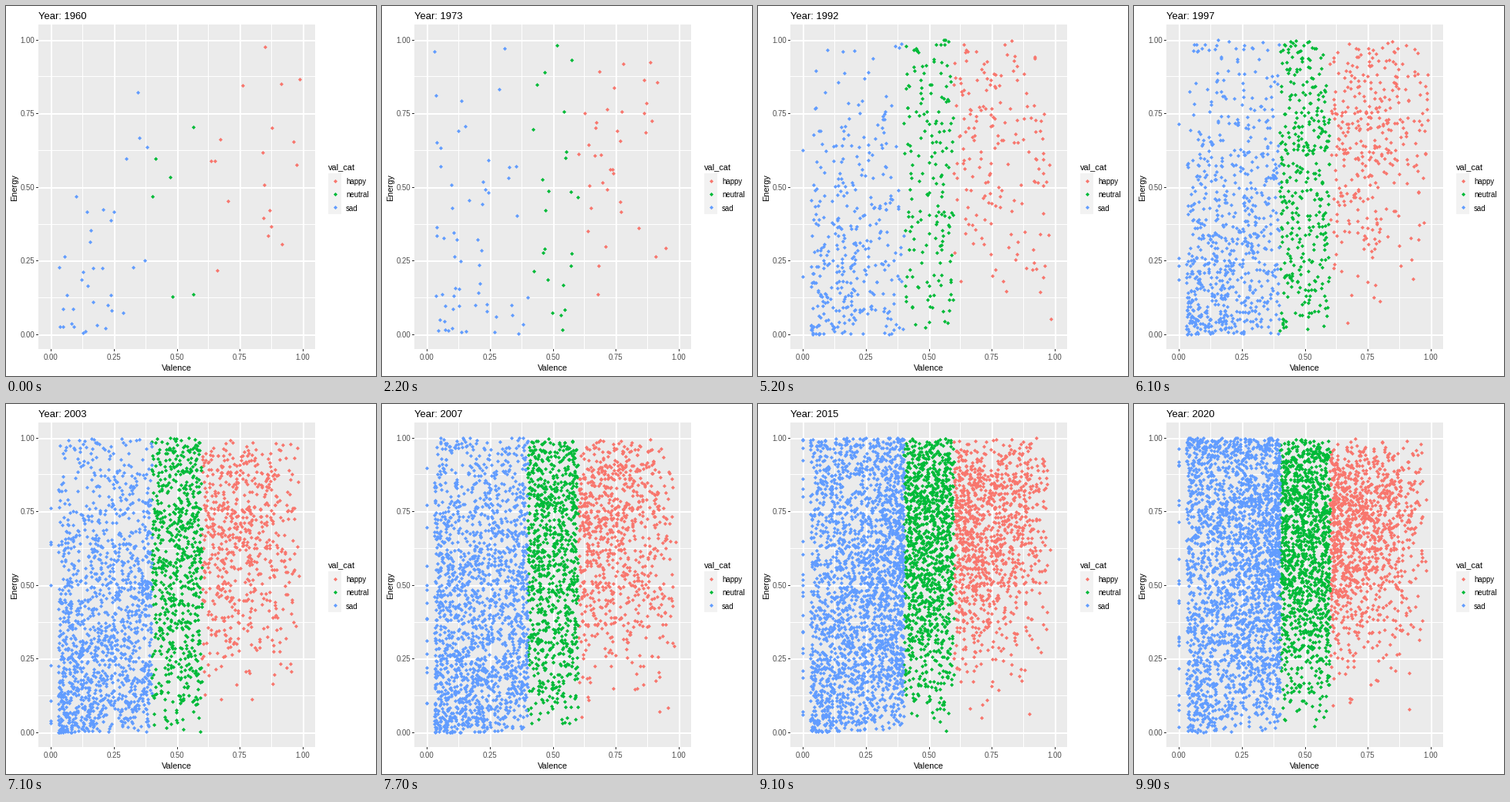
Write a matplotlib script that moves like this. It is 480 px wide and 480 px high and loops after 10 s.

```python
import numpy as np
import matplotlib.pyplot as plt
from matplotlib.animation import FuncAnimation
from matplotlib.patches import Rectangle

SIZE, FRAMES, STEP = 480, 100, 100
FIRST, LAST = 1960, 2020
LEFT, TOP, RIGHT, BOTTOM = 42, 24, 401, 445
COLORS = {"happy": "#F8766D", "neutral": "#00BA38", "sad": "#619CFF"}


def px(valence):
    return LEFT + 359 * (valence + 0.05) / 1.1


def py(energy):
    return 445.1 - 420.6 * (energy + 0.05) / 1.1


def count(u, start, growth):
    """Songs in a year: slow rise, then a logistic boom around 2003."""
    return int(start + 60 * u + growth / (1 + np.exp((0.71 - u) / 0.09)))


# Each mood returns valence and energy at progress u (0 to 1 over the years).

def happy(u, rng):
    n = count(u, 19, 1100)
    valence = 0.6 + 0.39 * rng.beta(1, 1 + 0.8 * u**2, n)
    return valence, rng.beta(2 + 1.8 * u**2, 1.4 + 0.5 * u**3, n)


def neutral(u, rng):
    n = count(u, 6, 1200)
    valence = rng.uniform(0.4, 0.6, n)
    return valence, rng.beta(1 + 1.3 * u**3, 1 + 0.4 * u**3, n)


def sad(u, rng):
    n = count(u, 36, 2450)
    t = rng.beta(0.8 + 0.1 * u, 1.4 - 0.65 * u, n)
    # quiet songs gather at the low-valence edge, less so in later years
    a = 0.6 + 0.15 * u + t * (0.4 + 0.7 * u**4)
    b = 0.8 + 2.7 * (1 - u) * (1 - 0.75 * t) + 0.6 * t
    valence, energy = 0.03 + 0.37 * t, rng.beta(a, b)
    # a few very loud songs, and a few without any valence
    energy = np.where(rng.random(n) < 0.03 * u, rng.uniform(0.96, 1, n), energy)
    valence = np.where(rng.random(n) < 0.012 * u, 0, valence)
    return valence, energy


MOODS = {"happy": happy, "neutral": neutral, "sad": sad}

plt.rcParams["font.family"] = "Liberation Sans"
fig = plt.figure(figsize=(SIZE / 72, SIZE / 72), dpi=72, facecolor="white")
ax = fig.add_axes([0, 0, 1, 1])
ax.set(xlim=(0, SIZE), ylim=(SIZE, 0))
ax.axis("off")


def box(x, y, w, h, color):
    ax.add_patch(Rectangle((x, y), w, h, fc=color, lw=0,
                           antialiased=False, zorder=1))


def label(x, y, text, size, color="black", **kw):
    return ax.text(x, y, text, fontsize=size, color=color, **kw)


def dots(mood, x=(), y=()):
    return ax.plot(x, y, "D", ms=3.6, mew=0, color=COLORS[mood], zorder=3)[0]


width, height = RIGHT - LEFT, BOTTOM - TOP
box(LEFT, TOP, width, height, "#EBEBEB")
for k in range(9):
    value, major = k / 8, k % 2 == 0
    x, y = round(px(value)), round(py(value))
    line = 2 if major else 1
    box(x, TOP, line, height, "white")
    box(LEFT, y, width, line, "white")
    if major:
        box(x, BOTTOM, 1, 3, "#333333")
        box(LEFT - 3, y, 3, 1, "#333333")
        label(x, 459, f"{value:.2f}", 9.6, "#4D4D4D", ha="center")
        label(37, y + 4, f"{value:.2f}", 9.6, "#4D4D4D", ha="right")

label(221.5, 473, "Valence", 11, ha="center")
label(16, 235.5, "Energy", 11, rotation=90, ha="right", va="center")
title = label(LEFT, 17, "", 13)

label(418, 212, "val_cat", 11)
box(418, 217, 17, 53, "#F2F2F2")
for i, mood in enumerate(MOODS):
    y = 226 + 17.4 * i
    dots(mood, [426.5], [y + 0.5])
    label(441, y + 5, mood, 9.6)

clouds = {mood: dots(mood) for mood in MOODS}


def draw(i):
    u = i / (FRAMES - 1)
    title.set_text(f"Year: {round(FIRST + (LAST - FIRST) * u)}")
    rng = np.random.default_rng(i)
    for mood, songs in MOODS.items():
        valence, energy = songs(u, rng)
        clouds[mood].set_data(px(valence), py(energy))
    return [title, *clouds.values()]


anim = FuncAnimation(fig, draw, frames=FRAMES, interval=STEP, repeat=True,
                     repeat_delay=0, blit=False)
plt.show()
```
